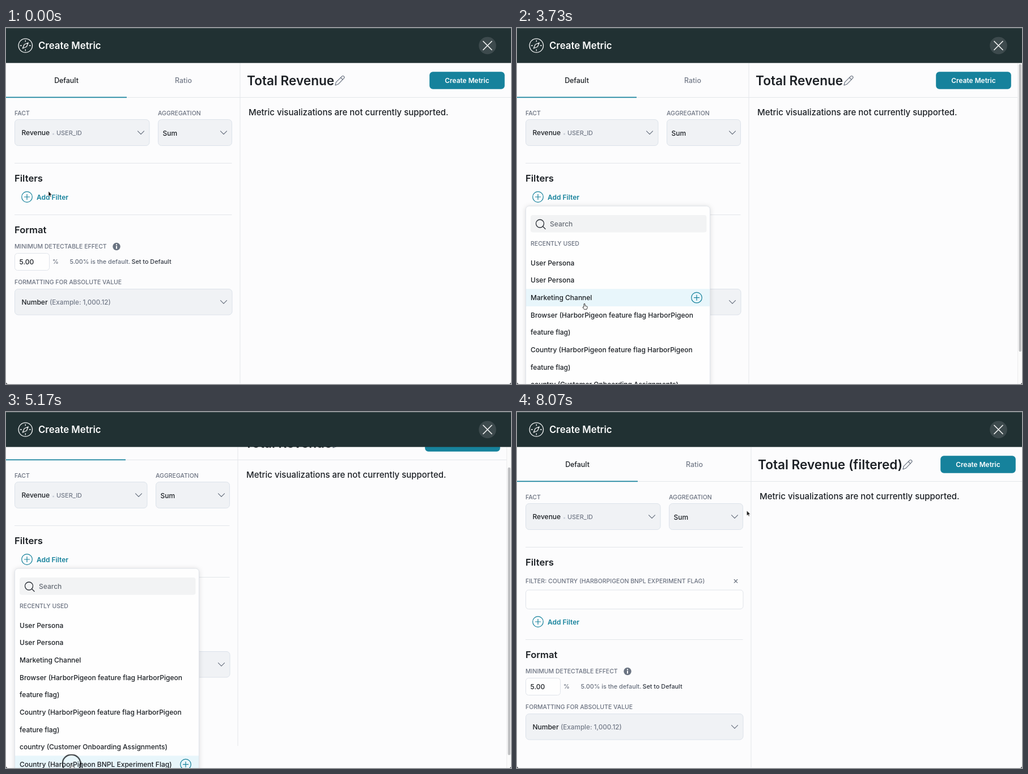
Animation of 891x628 px, one loop 8.11 s. Source, as an HTML page:

```html
<!DOCTYPE html>
<html lang="en">
<head>
<meta charset="utf-8">
<title>Create Metric</title>
<style>
@property --scroll { syntax: "<number>"; inherits: true; initial-value: 0; }

html, body { margin: 0; width: 100%; height: 100%; overflow: hidden; background: #22262a; }

svg {
  --narrow: 0; --open: 0; --done: 0; --hand: 0;
  --row: 0; --lines: 1; --hot: 0;
  display: block; width: 100%; height: 100%;
  font-family: Inter, "Open Sans", sans-serif; font-size: 12px; font-weight: 500;
  fill: #1c2025;
  animation: state 8110ms step-end infinite, hover 8110ms step-end infinite, scroll 8110ms linear infinite;
}

/* layout states: idle, hand over the button, menu open, filter added */
@keyframes state {
  0%     { --hand: 0; --narrow: 0; --open: 0; --done: 0; }
  3.7%   { --hand: 1; --narrow: 0; --open: 0; --done: 0; }
  14.8%  { --hand: 1; --narrow: 1; --open: 1; --done: 0; }
  64.98% { --hand: 0; --narrow: 0; --open: 0; --done: 1; }
}
@keyframes hover {
  0%     { --hot: 0; --row: 0; --lines: 1; }
  39.06% { --hot: 1; --row: 0; --lines: 1; }
  40.17% { --hot: 1; --row: 1; --lines: 1; }
  41.5%  { --hot: 1; --row: 2; --lines: 1; }
  55.49% { --hot: 1; --row: 3; --lines: 2; }
  57.26% { --hot: 1; --row: 5; --lines: 2; }
  59.04% { --hot: 1; --row: 7; --lines: 1; }
  60.05% { --hot: 1; --row: 8; --lines: 1; }
  64.98% { --hot: 0; --row: 0; --lines: 1; }
}
@keyframes scroll {
  0% { --scroll: 0; }
  47.84% { --scroll: 0; animation-timing-function: cubic-bezier(.333, .667, .667, 1); }
  57.71%, 64.97% { --scroll: 38; }
  64.98%, 100% { --scroll: 0; }
}
@keyframes pointer {
  0%, 1.85% { transform: translate(75px, 288px); }
  11.1%, 33.29% { transform: translate(61.5px, 300px); }
  44.39%, 46% { transform: translate(119px, 486px); }
  49.32%, 55.49% { transform: translate(121.5px, 488px); }
  61.41%, 70.28% { transform: translate(115.5px, 620.5px); }
  85.08%, 87.2% { transform: translate(404px, 244px); }
  96.8%, 100% { transform: translate(405.5px, 174px); }
}
@keyframes click {
  0%, 13.92% { opacity: 0; }
  13.93%, 16.5% { opacity: 1; }
  17.9%, 62.51% { opacity: 0; }
  62.52%, 65% { opacity: 1; }
  66.6%, 100% { opacity: 0; }
}

#page { transform: translateY(calc(var(--scroll) * -1px)); }
#lower { transform: translateY(calc(var(--done) * 72px)); }
#filter { opacity: var(--done); }
#menu { opacity: var(--open); }
#bar { opacity: var(--narrow); }
#thumb { transform: translateY(calc(var(--scroll) * .9px)); }
#pencil { transform: translateX(calc(var(--done) * 100px)); }
#suffix { fill-opacity: var(--done); }
#hot { opacity: var(--hot); transform: translateY(calc(var(--row) * 30.67px)); }
#hot rect { height: calc(var(--lines) * 30.67px); }
#hot g { transform: translateY(calc((var(--lines) - 1) * 15.33px)); }
#pointer { animation: pointer 8110ms ease-in-out infinite; }
#ring { animation: click 8110ms linear infinite; }
#hand { opacity: var(--hand); }
#arrow { opacity: calc(1 - var(--hand)); }

.s1 { transform: translateX(calc(var(--narrow) * -1px)); }
.s3 { transform: translateX(calc(var(--narrow) * -3px)); }
.s4 { transform: translateX(calc(var(--narrow) * -4px)); }
.s8 { transform: translateX(calc(var(--narrow) * -8px)); }
.full { width: calc(383.5px - var(--narrow) * 4px); }
.fact { width: calc(237.5px - var(--narrow) * 4px); }
.tab { width: calc(213px - var(--narrow) * 2px); }

.rule { fill: #e3e6ea; }
.box { fill: #f0f2f5; stroke: #dce2ea; }
.input { fill: #fefefe; stroke: #e0e4ea; }
.label { font-size: 10.5px; fill: #6b7280; }
.small { font-size: 10.8px; fill: #666e7c; }
.gray { fill: #737a88; }
.head { font-size: 16.6px; font-weight: 600; }
.bold { font-weight: 600; }
.teal { fill: #16829c; }
.line { fill: none; stroke: #626b7a; stroke-width: 1.1; stroke-linecap: round; stroke-linejoin: round; }
.tealline { fill: none; stroke: #16829c; stroke-width: 1.2; }
.white { fill: none; stroke: #f4f6f6; stroke-width: 1.3; stroke-linejoin: round; }
</style>
</head>
<body>
<svg viewBox="0 0 891 628" preserveAspectRatio="none">
  <defs>
    <path id="chevron" class="line" d="M-5.5 -2.7 L0 2.8 L5.5 -2.7"/>
    <g id="plus" class="tealline"><circle r="9.3"/><path d="M-5 0H5M0 -5V5"/></g>
    <clipPath id="window"><path d="M0 0H891V624Q891 628 887 628H4Q0 628 0 624Z"/></clipPath>
  </defs>

  <g clip-path="url(#window)">
    <rect width="891" height="628" fill="#fcfcfd"/>

    <g id="page">
      <rect class="rule" y="122" width="891" height="1"/>
      <rect class="rule s4" x="412.5" y="62" width="1" height="565"/>
      <rect class="teal tab" y="121.5" height="1.7"/>
      <text class="s1" x="106.5" y="97" text-anchor="middle" font-size="12.4">Default</text>
      <text class="gray s3" x="313" y="97" text-anchor="middle" font-size="12.4">Ratio</text>

      <text class="label" x="15" y="153.8">FACT</text>
      <rect class="box fact" x="15.5" y="161.5" height="46" rx="6"/>
      <text x="27.5" y="188.8">Revenue</text>
      <circle cx="83.5" cy="187" r="1.5" fill="#c8ced8"/>
      <text class="gray" x="89" y="188.8" font-size="10.9">USER_ID</text>
      <g class="s4">
        <use href="#chevron" x="238" y="184.5"/>
        <text class="label" x="268" y="153.8">AGGREGATION</text>
        <rect class="box" x="268.5" y="161.5" width="130" height="46" rx="6"/>
        <text x="276.5" y="189.8">Sum</text>
        <use href="#chevron" x="384" y="184.5"/>
      </g>
      <rect class="rule full" x="15" y="238" height="1"/>
      <text class="head" x="15" y="271">Filters</text>

      <g id="filter">
        <text class="label" x="15" y="302">FILTER: COUNTRY (HARBORPIGEON BNPL EXPERIMENT FLAG)</text>
        <path class="line" d="M383.2 295.5l5.6 5.6m0 -5.6l-5.6 5.6"/>
        <rect class="input full" x="15.5" y="314" height="33.5" rx="5"/>
      </g>

      <g id="lower">
        <use href="#plus" x="37" y="298"/>
        <text class="teal bold" x="54" y="302.5">Add Filter</text>
        <rect class="rule full" x="15" y="329" height="1"/>
        <text class="head" x="15" y="361.5">Format</text>
        <text class="label" x="15" y="389.3">MINIMUM DETECTABLE EFFECT</text>
        <circle cx="195" cy="385.5" r="6.7" fill="#6b7482"/>
        <path d="M194 381.3h2v1.9h-2zM194 384.4h2v5h-2z" fill="#fff"/>
        <rect class="input" x="15.5" y="397.5" width="61" height="30" rx="5"/>
        <text x="23.5" y="416.8">5.00</text>
        <text class="small" x="82" y="416.4">%</text>
        <text class="small" x="112.5" y="416.4">5.00% is the default.</text>
        <text class="small" x="221.5" y="416.4" style="fill:#343a44">Set to Default</text>
        <text class="label" x="15" y="452.3">FORMATTING FOR ABSOLUTE VALUE</text>
        <rect class="box full" x="15.5" y="460.5" height="45.5" rx="6"/>
        <text x="27.5" y="487.5">Number</text>
        <text class="gray" x="77" y="487.5" font-size="11.7">(Example: 1,000.12)</text>
        <g class="s4"><use href="#chevron" x="384" y="483.3"/></g>
      </g>

      <g class="s4">
        <text class="bold" x="425" y="100.7" font-size="22.6">Total Revenue<tspan id="suffix"> (filtered)</tspan></text>
        <g id="pencil">
          <path class="line" d="M581 101l1.3 -5.3L592.8 85.2q1.8 -1.5 3.4 .2q1.6 1.7 .1 3.3L585.9 99.3ZM590.5 87.5l3.7 3.7"/>
        </g>
        <text x="428" y="154.3" font-size="15">Metric visualizations are not currently supported.</text>
      </g>
      <g class="s8">
        <rect class="teal" x="747.2" y="77.2" width="132.6" height="30.6" rx="6"/>
        <text class="bold" x="813.5" y="97" text-anchor="middle" font-size="11.9" style="fill:#fff">Create Metric</text>
      </g>

      <g id="menu">
        <rect x="15.5" y="314" width="325" height="380" rx="6" fill="#fefefe" stroke="#dfe3e9" style="filter:drop-shadow(0 1px 4px #0002)"/>
        <rect x="24" y="330" width="310.5" height="30.5" rx="4" fill="#f2f3f4"/>
        <g class="line" style="stroke:#2a2f36;stroke-width:1.3"><circle cx="40.5" cy="345" r="7"/><path d="M45.5 350l4.5 4.5"/></g>
        <text x="58" y="349.5" fill="#666c75">Search</text>
        <text class="label" x="24" y="383.5">RECENTLY USED</text>
        <g id="hot">
          <rect x="16" y="399" width="324" fill="#e8f6fb"/>
          <g><use href="#plus" x="317" y="414.3"/></g>
        </g>
        <g id="items"></g>
      </g>
    </g>

    <g id="bar">
      <rect x="883" y="62" width="8" height="566" fill="#fafafa"/>
      <rect x="883" y="62" width="1" height="566" fill="#ececee"/>
      <rect id="thumb" x="885.5" y="63.5" width="4.5" height="507.5" rx="2.2" fill="#bfc0c2"/>
    </g>

    <rect width="891" height="61.7" fill="#213133"/>
    <rect width="891" height="1" fill="#4a575a"/>
    <g class="white">
      <circle cx="34.3" cy="31" r="12.2"/>
      <path d="M39.3 26L36.3 33L29.3 36L32.3 29ZM34.3 21.5v3M34.3 37.5v3M24.8 31h3M40.8 31h3"/>
    </g>
    <text class="bold" x="57" y="37" font-size="16.8" fill="#fbfcfc">Create Metric</text>
    <circle cx="849.5" cy="31" r="15.3" fill="#3d4a4d"/>
    <path class="white" d="M841.5 23l16 16m0 -16l-16 16" style="stroke-width:1.6"/>

    <g id="pointer">
      <circle id="ring" r="16" fill="none" stroke="#15181b" stroke-width="1.8"/>
      <path id="arrow" d="M0 0V8.8L2 7L3.4 10L4.7 9.4L3.4 6.5H6Z" fill="#111" stroke="#fff" stroke-width=".5"/>
      <path id="hand" d="M-1 .8Q0 -.6 1 .8V4L4.5 5Q5.5 5.5 5 7.5L4 10.3H-.5L-3 7Q-3 5.3 -1 6.3Z" fill="#fff" stroke="#222" stroke-width=".9"/>
    </g>
  </g>
</svg>
<script>
const flag = "HarborPigeon feature flag HarborPigeon";
const lines = [
  "User Persona", "User Persona", "Marketing Channel",
  `Browser (${flag}`, "feature flag)",
  `Country (${flag}`, "feature flag)",
  "country (Customer Onboarding Assignments)",
  "Country (HarborPigeon BNPL Experiment Flag)"
];
document.getElementById("items").innerHTML = lines
  .map((line, i) => `<text x="24" y="${418.5 + i * 30.67}">${line}</text>`)
  .join("");
</script>
</body>
</html>
```
